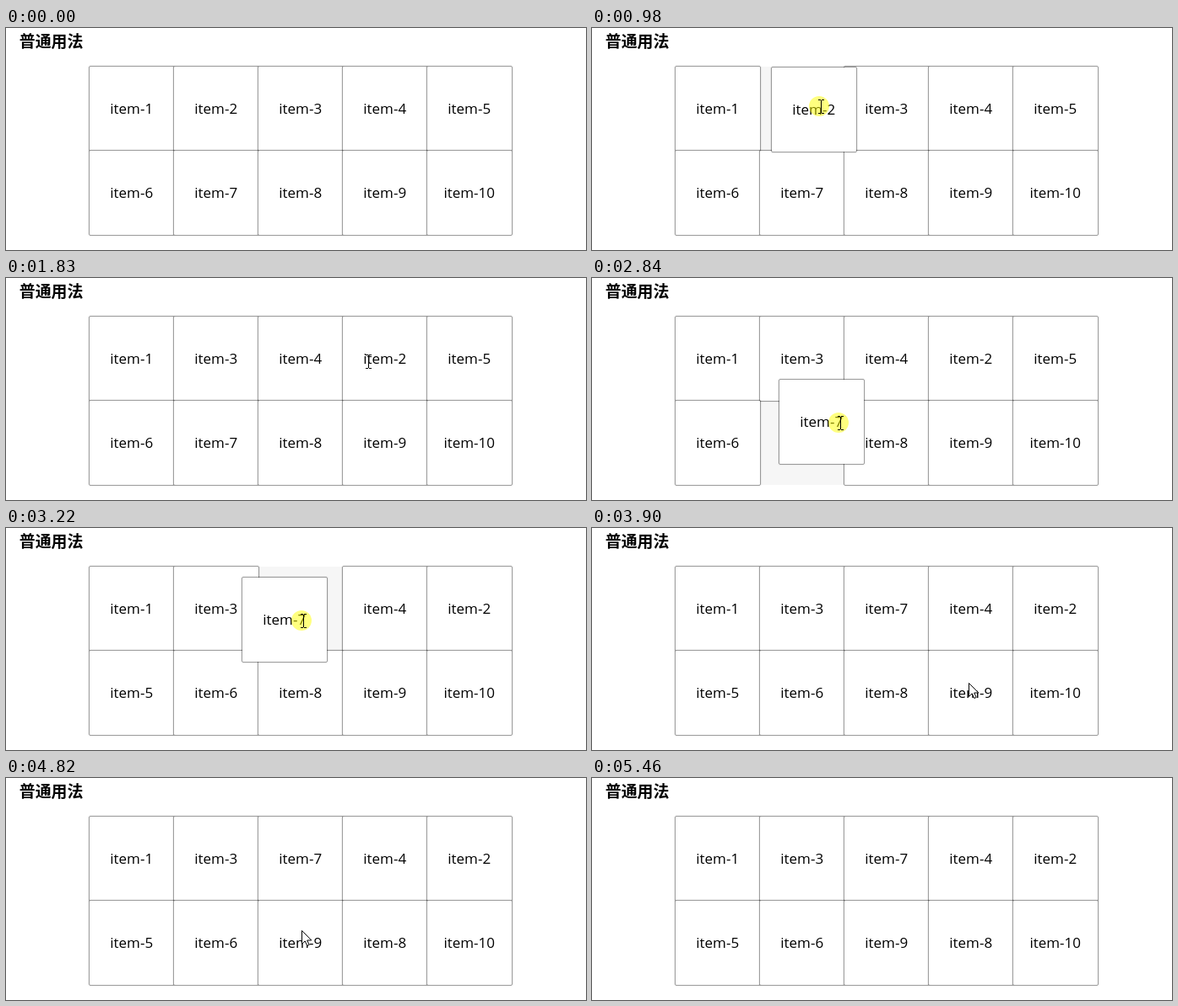
An HTML page that plays this animation: 687 by 264 pixels, repeating every 6.09 s.

```html
<!DOCTYPE html>
<html lang="zh-CN">
<head>
<meta charset="utf-8">
<title>普通用法</title>
<style>
  html, body { margin: 0; width: 100%; height: 100%; overflow: hidden; background: #fff; }
  svg { display: block; }
  .label { font: 17px "Open Sans", "Noto Sans", sans-serif; text-anchor: middle; }
  .title { font: bold 18.9px "Noto Sans CJK SC", "Noto Sans CJK", sans-serif; }
  .edge { fill: none; stroke: #000; stroke-opacity: .38; }
  .soft { fill: none; stroke: #000; stroke-opacity: .05; }
  #glow { fill: #ff0; fill-opacity: .5; }
</style>
</head>
<body>
<svg width="687" height="264" viewBox="0 0 687 264">
  <rect width="687" height="264" fill="#fff"/>
  <text class="title" x="15.8" y="23.4">普通用法</text>
  <rect x="99" y="46" width="500" height="200" fill="#f6f6f6"/>
  <g id="grid"></g>
  <circle id="glow" r="12"/>
  <path id="arrow" d="M.5 .5V16.5L4.2 12.9L6.8 18.5L9.2 17.4L6.7 12H11.8Z" fill="#fff" stroke="#000"/>
  <path id="beam" d="M-3 -7.5H0M1 -7.5H4M.5 -7V8M-3 8.5H0M1 8.5H4" fill="none" stroke="#000"/>
</svg>
<script>
const LOOP = 6090, COLS = 5, SIZE = 100, LEFT = 99, TOP = 46;

// Pointer glides: from a to b in n visible steps, ending at (x, y).
// One with an id drags that item and holds it until the next glide.
const ENTRY = { x: 572, y: 270 };
const glides = [
  { a: 70, b: 130, n: 2, x: 378, y: 149 },
  { a: 430, b: 660, n: 4, x: 257, y: 92 },
  { a: 900, b: 1430, n: 8, x: 429, y: 99, id: 2, pow: 1.8 },
  { a: 1830, b: 1830, n: 1, x: 429, y: 99 },
  { a: 1980, b: 2520, n: 8, x: 270, y: 197 },
  { a: 2590, b: 2590, n: 1, x: 271, y: 197 },
  { a: 2760, b: 3300, n: 8, x: 363, y: 97, id: 7 },
  { a: 3530, b: 3900, n: 6, x: 446, y: 184 },
  { a: 4130, b: 4520, n: 6, x: 350, y: 181, id: 9, pow: 2.1 },
  { a: 4820, b: 4900, n: 2, x: 350, y: 181 },
  { a: 5060, b: 5460, n: 6, x: 614, y: 270 }
];

const $ = id => document.getElementById(id);
const lerp = (p, q, k) => p + (q - p) * k;
const slotX = s => LEFT + s % COLS * SIZE;
const slotY = s => TOP + Math.floor(s / COLS) * SIZE;
const slotAt = (x, y) => Math.round((x - LEFT) / SIZE) + COLS * Math.round((y - TOP) / SIZE);
const place = (el, x, y) => el.setAttribute('transform', `translate(${Math.round(x)} ${Math.round(y)})`);
const show = (el, on) => el.setAttribute('visibility', on ? 'visible' : 'hidden');

function make(tag, attrs, parent) {
  const el = document.createElementNS('http://www.w3.org/2000/svg', tag);
  for (const k in attrs) el.setAttribute(k, attrs[k]);
  return parent.appendChild(el);
}

function ring(cls, out, parent) {
  const side = SIZE + 2 * out;
  make('rect', { class: cls, x: -out, y: -out, width: side, height: side, rx: out + 1 }, parent);
}

const grid = $('grid'), glow = $('glow'), arrow = $('arrow'), beam = $('beam');
const ids = Array.from({ length: 10 }, (_, i) => i + 1);
const items = {};
for (const id of ids) {
  const g = items[id] = make('g', {}, grid);
  make('rect', { width: SIZE, height: SIZE, fill: '#fff' }, g);
  ring('soft', 1.5, g);
  ring('edge', .5, g);
  make('text', { class: 'label', x: 49.7, y: 56 }, g).textContent = 'item-' + id;
}

function progress({ a, b, n, pow = 1 }, t) {
  const step = (b - a) / (n - 1) || 1;
  const i = Math.min(n - 1, Math.floor((t - a) / step + .1));
  return ((i + 1) / n) ** pow;
}

function overText({ x, y }) {
  const u = (x - LEFT) % SIZE, v = (y - TOP) % SIZE;
  return u > 24 && u < 76 && v > 39 && v < 63;
}

// Replays every glide begun by time t
function stateAt(t) {
  let order = ids.slice(), pos = ENTRY, drag = null, text = false;
  for (const glide of glides) {
    if (t < glide.a) break;
    const k = progress(glide, t), from = pos, { id } = glide;
    pos = { x: lerp(from.x, glide.x, k), y: lerp(from.y, glide.y, k) };
    text = overText(id ? from : pos);
    drag = null;
    if (id) {
      const home = order.indexOf(id);
      drag = { id, x: slotX(home) + pos.x - from.x, y: slotY(home) + pos.y - from.y };
      order = order.filter(n => n !== id);
      order.splice(slotAt(drag.x, drag.y), 0, id);
    }
  }
  return { order, pos, drag, text };
}

function draw(t) {
  const { order, pos, drag, text } = stateAt(t);
  order.forEach((id, s) => {
    place(items[id], slotX(s), slotY(s));
    grid.appendChild(items[id]);
  });
  if (drag) {
    place(items[drag.id], drag.x, drag.y);
    grid.appendChild(items[drag.id]);
  }
  show(glow, drag);
  show(arrow, !text);
  show(beam, text);
  place(glow, pos.x - 2, pos.y);
  place(arrow, pos.x, pos.y);
  place(beam, pos.x, pos.y);
}

const start = performance.now();
function tick() {
  draw((performance.now() - start) % LOOP);
  requestAnimationFrame(tick);
}
tick();
</script>
</body>
</html>
```
